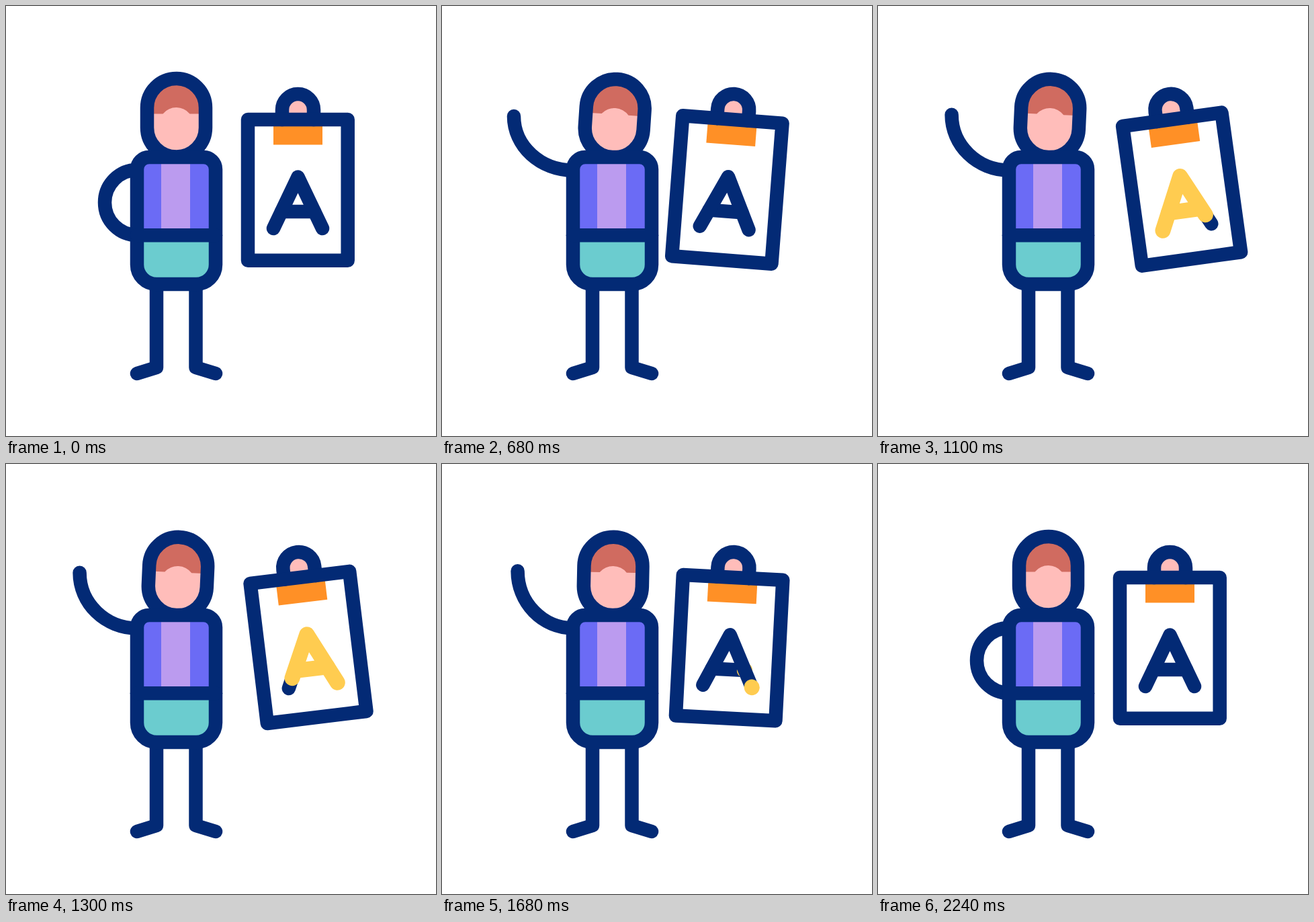
Recreate the animation shown at these times as an HTML page. Size 640 by 640 pixels, loop 2.4 s.

```html
<!DOCTYPE html>
<html lang="en">
<head>
<meta charset="utf-8">
<title>Waving figure with clipboard</title>
<style>
  html, body { margin: 0; width: 100%; height: 100%; overflow: hidden; background: #fff; }
  svg { display: block; width: 100%; height: 100%; }
  .line { fill: none; stroke: #032a75; stroke-width: 20.5; stroke-linecap: round; stroke-linejoin: round; }
  .trace { stroke: #ffcc50; stroke-width: 23; }
</style>
</head>
<body>
<svg viewBox="0 0 640 640">
  <defs>
    <rect id="skull" x="210" y="108" width="87" height="116.5" rx="43.5"/>
    <path id="trunk" d="M195 243a18 18 0 0 1 18-18h81a18 18 0 0 1 18 18v142a29 29 0 0 1-29 29h-59a29 29 0 0 1-29-29z"/>
    <rect id="sheet" x="360" y="169" width="148.7" height="209.7"/>
    <path id="clip" d="M411 169v-14.5a23.5 23.5 0 0 1 47 0V169"/>
    <path id="bar" pathLength="1" d="M410 306h49"/>
    <path id="peak" pathLength="1" d="M398 331L434.5 254.5L471 331"/>
    <clipPath id="face"><use href="#skull"/></clipPath>
    <clipPath id="torso"><use href="#trunk"/></clipPath>
  </defs>

  <path id="arm" class="line"/>
  <path class="line" d="M224 414V538L195 547M282.5 414V538L312 547"/>

  <g id="head">
    <g clip-path="url(#face)">
      <use href="#skull" fill="#ffbdba"/>
      <path fill="#d06b60" d="M205 100h100v60.5H273.5a26 26 0 0 0-40 0H205z"/>
    </g>
    <use href="#skull" class="line"/>
  </g>

  <g clip-path="url(#torso)">
    <use href="#trunk" fill="#6b6bf5"/>
    <rect fill="#bb9bef" x="231" y="225" width="43" height="116"/>
    <rect fill="#6bcccf" x="195" y="341" width="117" height="73"/>
  </g>
  <use href="#trunk" class="line"/>
  <path class="line" d="M195 341.3h117"/>

  <g id="board">
    <use href="#sheet" fill="#fff"/>
    <rect fill="#ff9026" x="398" y="169" width="73" height="37.5"/>
    <use href="#clip" fill="#ffbdba"/>
    <use href="#clip" class="line"/>
    <use href="#sheet" class="line"/>
    <use href="#bar" class="line"/>
    <use href="#bar" class="line trace"/>
    <use href="#peak" class="line"/>
    <use href="#peak" class="line trace"/>
  </g>
</svg>
<script>
const LOOP = 2400, STEP = 20;
const $ = id => document.getElementById(id);
const traces = document.querySelectorAll('.trace');

const mix = (a, b, k) => a + (b - a) * k;

// Eased 0 to 1 between two times.
function ramp(t, from, to) {
  const k = Math.min(1, Math.max(0, (t - from) / (to - from)));
  return (1 - Math.cos(Math.PI * k)) / 2;
}

// Elliptic arc around (195, cy) as two cubic curves: shoulder, elbow, hand.
function arc(cy, rx, ry, from, sweep) {
  const half = sweep / 2, k = 4 / 3 * Math.tan(half / 4), points = [];
  const add = (a, pull) => points.push(
    195 + rx * (Math.cos(a) - pull * Math.sin(a)),
    cy + ry * (Math.sin(a) + pull * Math.cos(a)));
  for (const a of [from, from + half, from + sweep]) {
    if (a !== from) add(a, -k);
    add(a, 0);
    if (a !== from + sweep) add(a, k);
  }
  return points;
}

const RIGHT = Math.PI / 2;
const onHip = arc(292.5, 48, 48.5, -RIGHT, -2 * RIGHT);
const waveOut = arc(168.3, 93.2, 76.4, RIGHT, RIGHT);
const waveIn = arc(142, 62, 101.8, RIGHT, RIGHT);

function draw(t) {
  const up = ramp(t, 200, 600) - ramp(t, 1800, 2200);
  const bend = t > 600 && t < 1800 ? (1 - Math.cos(Math.PI * (t - 600) / 300)) / 2 : 0;

  const p = onHip.map((v, i) => mix(v, mix(waveOut[i], waveIn[i], bend), up));
  $('arm').setAttribute('d', `M${p.slice(0, 2)}C${p.slice(2)}`);

  const tilt = up * mix(6.2, -8.3, bend);
  $('head').setAttribute('transform', `translate(0 ${0.8 * up}) rotate(${tilt} 253.5 222)`);

  const swing = 5 * ramp(t, 200, 600) - 13.8 * ramp(t, 600, 1200) + 12.8 * ramp(t, 1200, 1600)
    - 6.2 * ramp(t, 1600, 1900) + 2.2 * ramp(t, 1900, 2200);
  $('board').setAttribute('transform', `rotate(${swing} 434.5 144)`);

  const end = ramp(t, 700, 1200), start = ramp(t, 1200, 1700);
  for (const line of traces) {
    line.style.display = end > 0 && start < 1 ? '' : 'none';
    line.setAttribute('stroke-dasharray', `${Math.max(end - start, 0.0005)} 3`);
    line.setAttribute('stroke-dashoffset', -start);
  }
}

const begin = performance.now();
function frame() {
  const t = (performance.now() - begin) % LOOP;
  draw(Math.floor(t / STEP) * STEP);
  requestAnimationFrame(frame);
}
frame();
</script>
</body>
</html>
```
